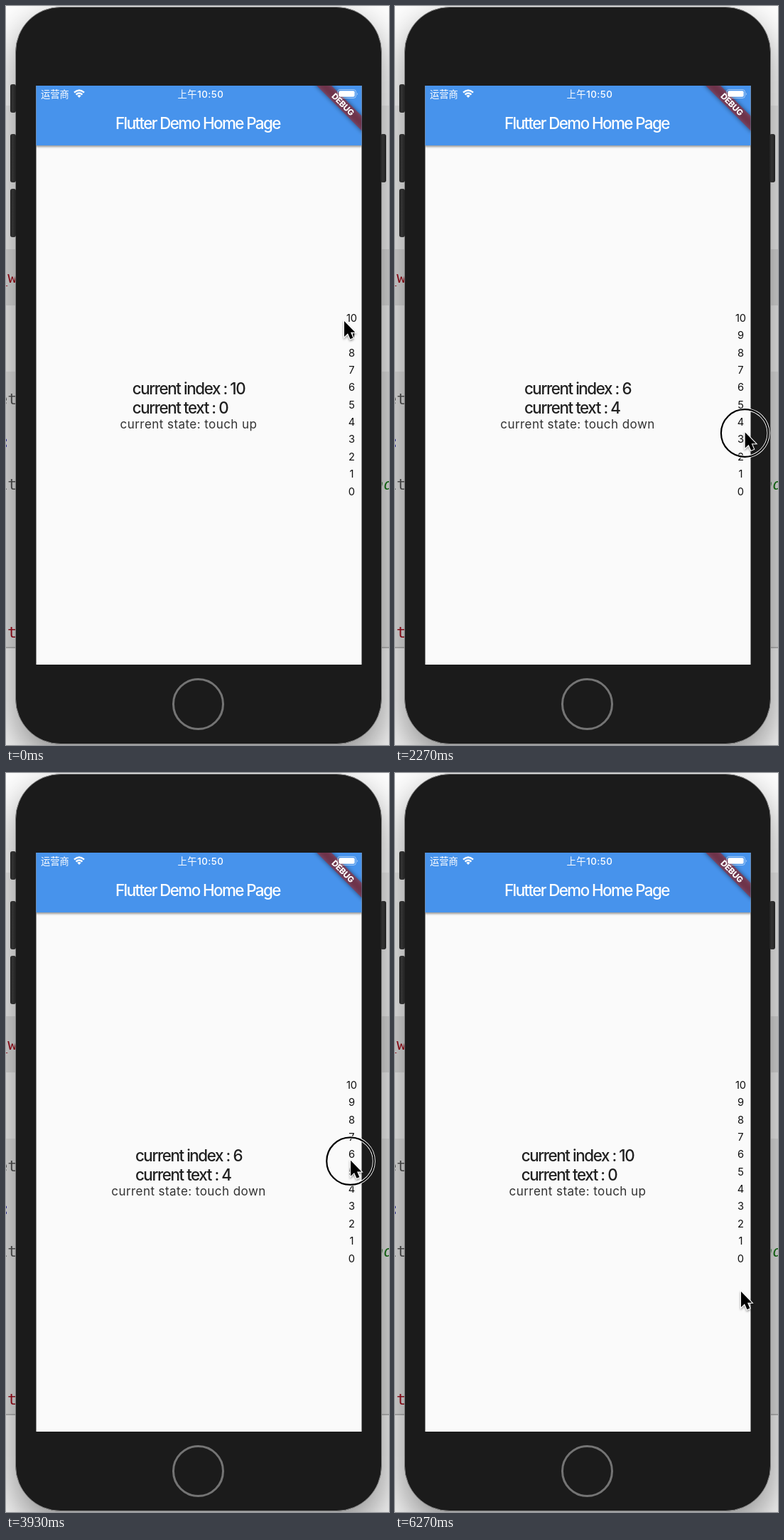
An HTML page that plays this animation: 539x1039 px, repeating every 6.34 s.

```html
<!DOCTYPE html>
<html lang="zh">
<head>
<meta charset="utf-8">
<title>Index bar demo</title>
<style>
html, body { margin: 0; width: 100%; height: 100%; overflow: hidden; background: #fff; }
#stage { position: relative; width: 539px; height: 1039px; overflow: hidden;
  font-family: Inter, "Noto Sans CJK SC", "Noto Sans CJK", sans-serif;
  background: linear-gradient(#fff 0 140px, #f1f1f1 140px 342px, #dcdcdc 342px 421px,
    #f1f1f1 421px 514px, #e2e2e2 514px 901px, #bbb 901px 903px, #f6f6f6 903px); }
#stage > * { position: absolute; }
.code { font: 22px "DejaVu Sans Mono", monospace; line-height: 26px; white-space: pre; }
#phone { left: 13px; top: 1px; width: 514px; height: 1035px; border: 1px solid #858585;
  border-radius: 64px; background: #1b1b1b; box-shadow: 0 22px 55px rgba(0,0,0,.45); }
.key { background: linear-gradient(90deg, #222, #333 40%, #222); border-radius: 3px; width: 8px; }
#home { left: 234px; top: 945px; width: 67px; height: 67px; border: 3px solid #747474; border-radius: 50%; }
svg { left: 0; top: 0; }
#lines, #state { left: 257px; transform: translateX(-50%); white-space: pre; color: #212121; }
#lines { top: 525px; font-size: 22.4px; line-height: 26.5px; font-weight: 500; letter-spacing: -1.44px; }
#state { top: 577px; font-size: 17.1px; line-height: 22px; letter-spacing: .4px; color: #333; }
</style>
</head>
<body>
<div id="stage">
  <div class="code" style="left:-10px;top:197px;color:#a00d1c">)</div>
  <div class="code" style="left:-11px;top:369px;color:#a00d1c">_w</div>
  <div class="code" style="left:-11px;top:540px;color:#555">et</div>
  <div class="code" style="left:-7px;top:600px;color:#3434a8">:</div>
  <div class="code" style="left:-11px;top:660px;color:#555">it</div>
  <div class="code" style="left:2px;top:868px;color:#a00d1c">t</div>
  <div class="code" style="left:518px;top:660px;color:#187518;font-style:italic">nd</div>
  <div id="phone"></div>
  <div class="key" style="left:6px;top:110px;height:40px"></div>
  <div class="key" style="left:6px;top:180px;height:68px"></div>
  <div class="key" style="left:6px;top:257px;height:68px"></div>
  <div class="key" style="left:527px;top:180px;height:68px"></div>
  <div id="home"></div>
  <svg width="539" height="1039">
    <defs>
      <clipPath id="clip"><rect x="42.5" y="112" width="458" height="814"/></clipPath>
      <filter id="soft" x="-20%" y="-80%" width="140%" height="260%"><feGaussianBlur stdDeviation="3"/></filter>
      <filter id="drop" x="-50%" y="-50%" width="200%" height="200%">
        <feDropShadow dx="0" dy="2" stdDeviation="1.5" flood-opacity=".4"/>
      </filter>
    </defs>
    <g clip-path="url(#clip)">
      <rect x="42" y="112" width="459" height="814" fill="#fafafa"/>
      <rect x="42" y="112" width="459" height="84" fill="#4693ec" filter="url(#drop)"/>
      <g transform="translate(500.5 112) rotate(45)">
        <rect x="-49" y="30" width="98" height="14.7" fill-opacity=".5" filter="url(#soft)"/>
        <rect x="-49" y="30" width="98" height="14.7" fill="#b71c1c" fill-opacity=".5"/>
        <text y="41.5" fill="#fff" font-size="11.6" font-weight="800" text-anchor="middle" letter-spacing="-.3">DEBUG</text>
      </g>
    </g>
    <g fill="#fff">
      <text x="154" y="173" font-size="22.4" font-weight="500" letter-spacing="-1.6">Flutter Demo Home Page</text>
      <text x="49" y="128.5" font-size="13.3">运营商</text>
      <text x="274" y="128.5" font-size="13.4" font-weight="500" text-anchor="middle" letter-spacing=".45">上午10:50</text>
      <g fill="none" stroke="#fff" stroke-width="2.4">
        <path d="M96 121.6Q103 115.2 110 121.6M98.6 124.6Q103 120.6 107.4 124.6"/>
        <path d="M100.4 126.2Q103 124 105.6 126.2L103 129Z" fill="#fff" stroke="none"/>
      </g>
    </g>
    <rect x="466.5" y="117.5" width="26" height="12" rx="3.5" fill="none" stroke="#fff" stroke-opacity=".5"/>
    <rect x="468.3" y="119.2" width="22.4" height="8.6" rx="2" fill="#fff"/>
    <path d="M494 121.5q1.6 2 0 4z" fill="#fff" fill-opacity=".6"/>
    <g id="rows" font-size="14.7" text-anchor="middle" fill="#111"></g>
  </svg>
  <div id="lines"></div>
  <div id="state"></div>
  <svg width="539" height="1039">
    <g id="touch" fill="none">
      <circle r="33.3" stroke="#fff" stroke-width="4"/>
      <circle r="33.3" stroke="#000" stroke-width="2.2"/>
    </g>
    <path id="arrow" d="M1 2V24L6 19.3L9.5 27.2L13.4 25.5L10 17.8H16.3Z" stroke="#fff" stroke-width="2"
      paint-order="stroke" filter="url(#drop)"/>
  </svg>
</div>
<script>
const $ = id => document.getElementById(id);
const LOOP = 6340, STEP = 200 / 3, LAG = 100, DOWN = 870, UP = 5600;
const TOP = 439, ROW = 24.35, LAST = 10;

// pointer path: time, x, y
const path = [
  [0, 475, 441], [670, 486, 459], [1000, 486, 459], [1870, 494, 544], [2730, 489, 660],
  [3050, 487, 682], [3520, 487, 682], [4220, 482, 446], [4370, 483, 487], [4470, 484, 531],
  [4850, 486, 682], [5500, 486, 690], [6130, 486, 727], [LOOP, 486, 727]
];

function pointer(t) {
  const i = Math.max(1, path.findIndex(p => p[0] > t));
  const [t0, x0, y0] = path[i - 1], [t1, x1, y1] = path[i];
  const k = (t - t0) / (t1 - t0);
  return [x0 + (x1 - x0) * k, y0 + (y1 - y0) * k];
}

for (let i = 0; i <= LAST; i++) {
  $('rows').innerHTML += `<text x="486.5" y="${TOP + 5 + i * ROW}">${LAST - i}</text>`;
}

function draw(now) {
  // 15 pictures a second, with their times rounded to 10 ms
  const t = Math.floor((now % LOOP + 5) / STEP) * STEP;
  const [x, y] = pointer(t);
  const held = t >= DOWN && t < UP;
  const row = held ? Math.round((pointer(t - LAG)[1] - TOP) / ROW) : LAST;
  const index = Math.max(0, Math.min(LAST, row));

  $('lines').textContent = `current index : ${index}\ncurrent text : ${LAST - index}`;
  $('state').textContent = `current state: touch ${held ? 'down' : 'up'}`;
  $('arrow').setAttribute('transform', `translate(${x} ${y})`);
  $('touch').setAttribute('transform', `translate(${x + .5} ${y + 3})`);
  $('touch').style.display = held ? '' : 'none';
  requestAnimationFrame(draw);
}
requestAnimationFrame(draw);
</script>
</body>
</html>
```
